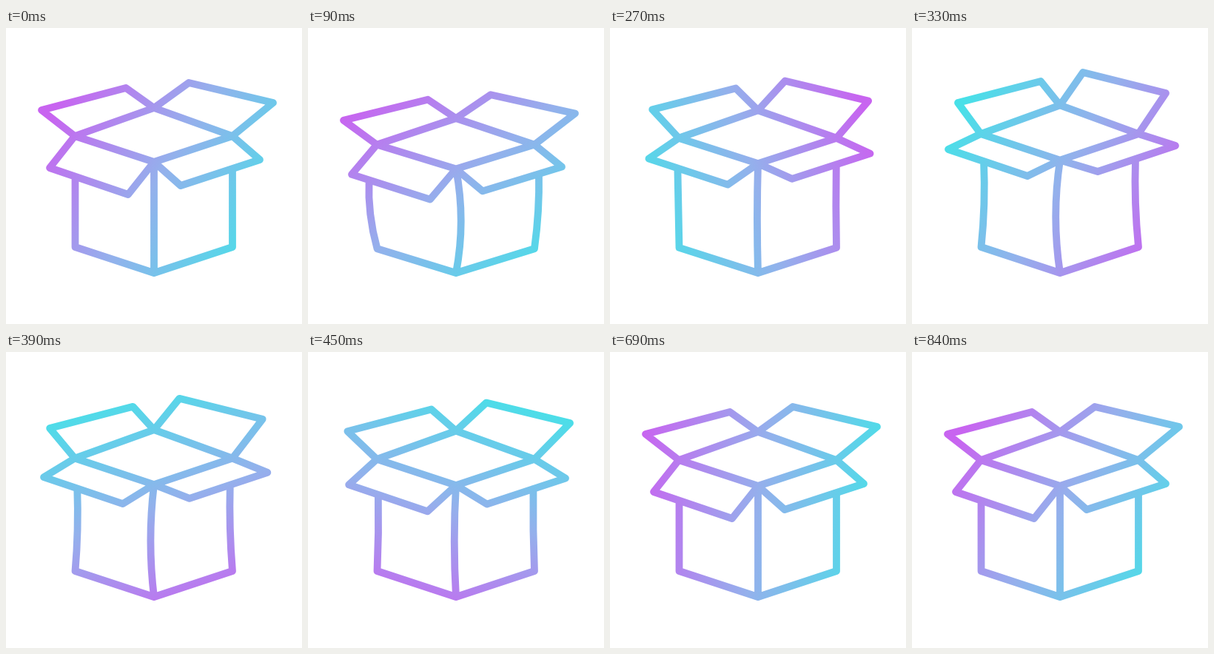
Write an HTML page with a canvas that moves like this. It is 400 px wide and 400 px high and loops after 2.9 s.

```html
<!DOCTYPE html>
<html lang="en">
<head>
<meta charset="utf-8">
<title>Bouncing box</title>
<style>
  html, body { margin: 0; width: 100%; height: 100%; overflow: hidden; background: #fff; }
  canvas { display: block; }
</style>
</head>
<body>
<canvas id="stage" width="400" height="400"></canvas>
<script>
const ctx = document.getElementById('stage').getContext('2d');
const LOOP = 2900, FLOOR = 331;

// Each flap: rim corners it hangs from, its two tips at rest, the tips when flung.
const RIM = { back: [200, 108], left: [93, 146], right: [306, 146], front: [200, 181] };
const FLAPS = [
  { from: 'left', to: 'back', rest: [[48, 111], [162, 81]], flung: [[62, 101], [174, 72]] },
  { from: 'back', to: 'right', rest: [[247, 74], [361, 101]], flung: [[231, 60], [343, 88]] },
  { from: 'left', to: 'front', rest: [[59, 189], [165, 225]], flung: [[49, 164], [156, 200]] },
  { from: 'front', to: 'right', rest: [[236, 213], [343, 178]], flung: [[251, 194], [356, 159]] },
];

// Direction of the violet end of the gradient: [ms, degrees].
const SPIN = [[0, 211], [90, 231], [210, 298], [330, 388], [450, 467], [540, 504], [840, 571]];

const lerp = (a, b, u) => a + (b - a) * u;

function ease(from, to, t) {
  const u = Math.min(1, Math.max(0, (t - from) / (to - from)));
  return u * u * (3 - 2 * u);
}

// Smooth curve through the keys, at rest at both ends.
function spline(keys, t) {
  const last = keys.length - 1;
  if (t >= keys[last][0]) return keys[last][1];
  const slope = i => i === 0 || i === last ? 0
    : (keys[i + 1][1] - keys[i - 1][1]) / (keys[i + 1][0] - keys[i - 1][0]);
  const i = keys.findIndex(k => k[0] > t) - 1;
  const [t0, a] = keys[i], [t1, b] = keys[i + 1];
  const span = t1 - t0, u = (t - t0) / span;
  return lerp(a, b, u * u * (3 - 2 * u))
    + span * u * (1 - u) * (slope(i) * (1 - u) - slope(i + 1) * u);
}

function gradient(degrees) {
  const a = degrees * Math.PI / 180;
  const dx = 168 * Math.cos(a), dy = 168 * Math.sin(a);
  const g = ctx.createLinearGradient(200 + dx, 212 + dy, 200 - dx, 212 - dy);
  g.addColorStop(0, '#c864f0');
  g.addColorStop(.5, '#94b0ec');
  g.addColorStop(1, '#48e0e8');
  return g;
}

function draw(t) {
  const release = ease(180, 330, t);
  const squash = 1.17 * (ease(0, 120, t) - release);
  const fling = release - ease(330, 540, t);
  const stretch = 1 - .063 * squash + .016 * fling;

  const squeeze = ([x, y], k = stretch) => [x, FLOOR - (FLOOR - y) * k];
  const base = p => squeeze(p, 1 - .063 * squash);
  const rim = name => squeeze(RIM[name]);
  const tips = flap => flap.rest.map(([x, y], i) => base([
    lerp(x, flap.flung[i][0], fling),
    lerp(y, flap.flung[i][1], fling),
  ]));
  const line = points => points.forEach(p => ctx.lineTo(...p));

  // A wall from its top point to its foot, bowed towards x = bow.
  const wall = (top, bow, foot) => {
    ctx.moveTo(...top);
    ctx.quadraticCurveTo(bow, (top[1] + foot[1]) / 2, ...foot);
  };
  // Point on a flap's lower edge, where a side wall comes out.
  const under = (flap, x) => {
    const [a, b] = tips(flap);
    return [x, lerp(a[1], b[1], (x - a[0]) / (b[0] - a[0]))];
  };

  ctx.fillStyle = '#fff';
  ctx.fillRect(0, 0, 400, 400);
  ctx.strokeStyle = gradient(spline(SPIN, t));
  ctx.lineWidth = 9.8;
  ctx.lineCap = ctx.lineJoin = 'round';
  ctx.beginPath();

  for (const flap of FLAPS) {
    ctx.moveTo(...rim(flap.from));
    line([...tips(flap), rim(flap.to)]);
    ctx.closePath();
  }

  const footLeft = base([93.5, 296]), foot = [200, FLOOR], footRight = base([306, 296]);
  wall(under(FLAPS[2], 93.5 - 11 * squash + 3.5 * fling), 93.5 - 13 * squash + 6 * fling, footLeft);
  line([foot, footRight]);
  wall(under(FLAPS[3], 306 + 6 * squash - 4 * fling), 306 + 7 * squash - 6 * fling, footRight);
  wall(rim('front'), 200 + 13.5 * squash - 11.5 * fling, foot);
  ctx.stroke();
}

const start = performance.now();
function tick() {
  draw((performance.now() - start) % LOOP);
  requestAnimationFrame(tick);
}
tick();
</script>
</body>
</html>
```
